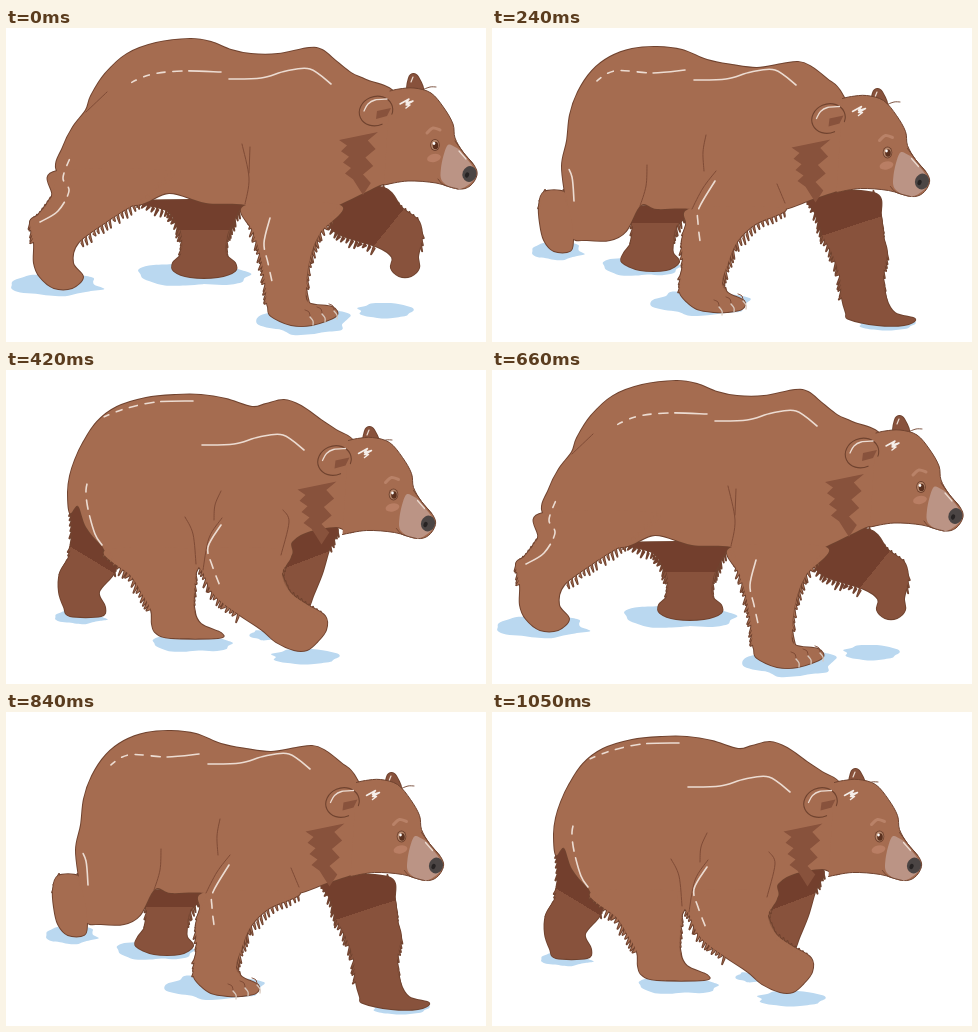
These frames come from a looping animation (480x314 px, 1.26 s). An HTML page with a canvas:

```html
<!DOCTYPE html>
<html lang="en">
<head>
<meta charset="utf-8">
<title>Walking bear</title>
<style>
html, body { margin: 0; width: 100%; height: 100%; overflow: hidden; background: #fff; }
canvas { display: block; }
</style>
</head>
<body>
<canvas id="stage" width="480" height="314"></canvas>
<script>
const ctx = document.getElementById('stage').getContext('2d');
const COAT = '#a56c50', FAR = '#88523c', DEEP = '#733f2d', EDGE = '#70432f',
      CREASE = '#7f4b36', SNOW = '#bad8f0', SHINE = '#ecdcd2';
const HOLD = 210;
const DASH = [32, 7, 9, 8, 8, 8, 6, 8, 5, 99];

// Each leg row is "left,right,y"; far legs turn from deep to lighter at the point "fade".
const poses = [
  {
    head: [0, 0], ear: [0, 0], wave: [0, 0],
    torso: `51,143 57,119 67,99 80,82 85,68 99,46 121,26 150,15 184,11 205,14 225,22 245,26 272,26 303,20 316,22
      331,34 345,45 360,52 390,66 405,110 390,150 372,158 335,176 300,190 240,177 200,175 163,165 130,177 80,170`,
    near: ['51,165,143 46,140,168 33,112,186 24,100,194 28,72,215 28,67,235 34,77,249 48,66,260',
           '240,334,177 248,314,205 255,304,230 260,300,260 261,303,275 262,326,279 265,330,288 285,306,297'],
    far: [{ fade: [0, 202], rows: '134,240,173 160,233,182 170,227,194 176,221,208 175,220,226 167,229,235 168,229,243 184,212,249' },
          { fade: [329, 266], rows: '335,378,160 323,396,180 321,412,192 333,416,206 372,414,219 386,412,229 385,413,240 393,405,248' }],
    snow: [[51, 257, 46, 11], [189, 246, 55, 12], [296, 292, 47, 14], [380, 283, 28, 8]],
    shine: ['215,44 176,43 143,47 115,60', '34,194 52,183 63,163 57,150 64,130', '264,190 258,215 262,235 267,258'],
    creases: ['236,116 243,150 239,176', '244,119 243,145', '80,84 101,64'],
    toes: [304, 288]
  },
  {
    head: [-33.5, 7.5], ear: [-22, 15], wave: [-21, 1],
    torso: `74,172 70,138 75,113 78,87 86,64 100,43 118,29 140,21 165,19 190,22 215,32 240,37 265,40 290,36 306,34
      318,38 335,51 350,66 372,118 357,158 345,163 318,172 293,181 250,190 199,181 165,181 149,177 134,203 118,212 95,212 79,208`,
    near: ['52,72,164 47,76,178 48,80,195 52,81,212 62,78,223',
           '201,292,180 194,262,197 190,245,214 191,236,235 188,230,255 188,236,265 194,252,273 205,250,281 222,235,284'],
    far: [{ fade: [0, 195], rows: '138,196,180 141,184,199 139,181,215 132,181,225 130,187,234 148,174,242' },
          { fade: [93, 285], rows: '316,382,165 325,389,188 331,391,208 340,395,225 348,391,248 350,394,270 354,403,285 357,423,291 385,412,297' }],
    snow: [[66, 223, 26, 9], [150, 238, 38, 10], [207, 275, 50, 12], [395, 296, 29, 7]],
    shine: ['193,42 160,45 122,43 100,57', '82,173 80,149 74,136', '223,153 207,180 206,195 208,213'],
    creases: ['214,107 211,124 212,143', '224,143 211,160 200,181', '155,137 154,158 148,178', '285,156 293,175'],
    toes: [227, 278]
  },
  {
    head: [-41.5, 7.5], ear: [-44, 11], wave: [-27, 24],
    torso: `72,136 64,143 62,122 64,106 69,90 77,73 91,52 111,37 140,28 170,25 195,25 220,29 246,37 260,34 278,30
      295,36 315,50 330,60 350,74 364,118 349,160 330,157 302,162 286,172 278,189 190,194 113,190 95,175 80,157`,
    near: ['100,190,180 125,189,206 135,188,222 145,188,240 146,195,254 150,215,263 165,212,268',
           '190,280,180 198,276,204 206,284,222 218,300,234 235,319,246 256,320,260 270,311,272 288,301,280'],
    far: [{ fade: [-61, 101], rows: '66,76,140 66,95,165 64,110,185 54,108,203 53,93,222 58,99,237 64,95,246' },
          { fade: [102, 266], rows: '300,331,158 280,323,180 276,316,204 284,307,226 295,303,236' }],
    snow: [[75, 247, 26, 7], [187, 273, 39, 9], [259, 265, 16, 5], [300, 287, 34, 8]],
    shine: ['187,31 150,32 118,39 93,49', '96,175 89,164 82,139 80,120 83,108', '215,155 202,177 206,195 214,216'],
    creases: ['179,147 187,164 190,194', '215,121 209,135 208,150', '216,148 203,168 197,200', '277,140 283,152 275,185']
  }
];

let seed = 1;
const random = () => (seed = seed * 16807 % 2147483647) / 2147483647;
const parse = s => s.trim().split(/\s+/).map(p => p.split(',').map(Number));

// Smooth curve through all points.
function curve(p, closed) {
  const path = new Path2D(), n = p.length;
  const at = i => closed ? p[(i + n) % n] : p[Math.max(0, Math.min(n - 1, i))];
  path.moveTo(...p[0]);
  for (let i = 0; i < (closed ? n : n - 1); i++) {
    const [a, b, c, d] = [at(i - 1), at(i), at(i + 1), at(i + 2)];
    path.bezierCurveTo(b[0] + (c[0] - a[0]) / 6, b[1] + (c[1] - a[1]) / 6,
                       c[0] - (d[0] - b[0]) / 6, c[1] - (d[1] - b[1]) / 6, ...c);
  }
  return path;
}

function fill(path, color) {
  ctx.fillStyle = color;
  ctx.fill(path);
}

function stroke(path, color, width) {
  ctx.strokeStyle = color;
  ctx.lineWidth = width;
  ctx.stroke(path);
}

const line = (s, color, width) => stroke(curve(parse(s)), color, width);

function oval(x, y, rx, ry, color, turn = 0) {
  const path = new Path2D();
  path.ellipse(x, y, rx, ry, turn, 0, 7);
  fill(path, color);
}

function shifted([x, y], paint) {
  ctx.save();
  ctx.translate(x, y);
  paint();
  ctx.restore();
}

// Hanging tufts along one side of a leg.
function fur(side, lean) {
  const path = new Path2D();
  for (let i = 0; i < side.length - 4; i++) {
    const [x, y] = side[i], dx = side[i + 1][0] - x, dy = side[i + 1][1] - y;
    const count = Math.ceil(Math.hypot(dx, dy) / 5);
    for (let k = 0; k < count; k++) {
      const px = x + dx * k / count, py = y + dy * k / count;
      path.moveTo(px - lean, py - 2);
      path.lineTo(px + lean * (1 + 2 * random()), py + 4 + 5 * random());
      path.lineTo(px - lean, py + 3);
    }
  }
  return path;
}

function leg(rows) {
  const r = parse(rows), left = r.map(([l, , y]) => [l, y]), right = r.map(([, x, y]) => [x, y]);
  return [curve([...left, ...[...right].reverse()], true), fur(left, -1), fur(right, 0.6)];
}

// Outline the parts as one silhouette.
function merge(parts, color) {
  parts.forEach(p => stroke(p, EDGE, 2));
  parts.forEach(p => fill(p, color));
}

function puddle([x, y, rx, ry]) {
  const p = [];
  for (let a = 0; a < 6.2; a += Math.PI / 9) {
    const k = 0.82 + 0.3 * random();
    p.push([x + rx * k * Math.cos(a), y + ry * k * Math.sin(a)]);
  }
  fill(curve(p, true), SNOW);
}

function farLeg({ fade, rows }) {
  const shade = ctx.createLinearGradient(0, 0, ...fade);
  shade.addColorStop(1, DEEP);
  shade.addColorStop(1, FAR);
  merge(leg(rows), shade);
}

function farEar() {
  merge([curve(parse('402,63 403,50 407,46 412,49 417,63'), true)], FAR);
  line('405,54 407,49', SHINE, 1.2);
  line('416,62 424,59 430,59', EDGE, 0.9);
}

function ruff() {
  const path = new Path2D();
  for (let i = 0; i < 8; i++) path.lineTo(333 + i + i % 2 * 7, 112 + i * 5.6);
  path.lineTo(357, 167);
  for (let i = 6; i >= 0; i--) path.lineTo(372 - i * 1.2 - i % 2 * 9, 104 + i * 8.5);
  fill(path, FAR);
}

function toes([x, y]) {
  for (let i = 0; i < 3; i++) {
    const tx = x + i * 12, ty = y - i * 3;
    line(`${tx - 5},${ty - 6} ${tx - 1},${ty - 4} ${tx},${ty}`, CREASE, 1);
    line(`${tx},${ty + 1} ${tx + 3},${ty + 5} ${tx + 3},${ty + 9}`, '#d8c8bd', 1.3);
  }
}

function nearEar() {
  const path = new Path2D();
  path.ellipse(370, 83, 17, 14.5, -0.35, 1.5, 6.9);
  fill(path, COAT);
  stroke(path, EDGE, 1.1);
  fill(new Path2D('M371 83L385 80L381 88L370 91Z'), FAR);
  line('358,83 362,76 369,72 381,71', SHINE, 1.3);
}

function face() {
  fill(curve(parse('441,118 435,140 437,154 454,161 470,147 457,126 449,119'), true), '#bb9485');
  line('449,113 457,124 467,136', EDGE, 0.9);
  line('432,151 438,157 452,161', EDGE, 0.9);
  line('453,123 460,131', SHINE, 1.2);
  oval(463.5, 146, 7, 8, '#4b4544', 0.35);
  oval(461, 147, 2, 2.7, '#272323', 0.4);
  oval(428, 130, 7, 4, '#b97e64', -0.2);
  line('421,105 427,100 434,102', '#b98268', 3);
  oval(429, 117, 4.8, 6, EDGE);
  oval(429, 117, 3.9, 5, '#b98b70');
  oval(429.5, 117.5, 2.8, 3.8, '#5b311f');
  oval(428, 115.5, 1.3, 1.4, '#fff');
}

function head() {
  const skull = curve(parse('384,63 393,61 408,60 425,65 438,80 447,96 449,110 457,124 468,137 471,147 464,158 452,161 430,155 402,153 378,157'));
  fill(skull, COAT);
  stroke(skull, EDGE, 1);
  face();
  nearEar();
  stroke(new Path2D('M394 76L403 71L400 75L407 73L400 77L404 77L400 80'), '#f5eee9', 1.5);
}

function draw(pose) {
  seed = 7;
  ctx.fillStyle = '#fff';
  ctx.fillRect(0, 0, 480, 314);
  pose.snow.forEach(puddle);
  pose.far.forEach(farLeg);
  shifted(pose.ear, farEar);
  merge([curve(parse(pose.torso), true), ...pose.near.flatMap(leg)], COAT);
  shifted(pose.head, ruff);
  pose.creases.forEach(s => line(s, CREASE, 1));
  if (pose.toes) toes(pose.toes);
  shifted(pose.wave, () => line('223,51 255,50 280,43 304,41 325,56', SHINE, 1.6));
  ctx.setLineDash(DASH);
  pose.shine.forEach(s => line(s, SHINE, 1.6));
  ctx.setLineDash([]);
  shifted(pose.head, head);
}

ctx.lineCap = ctx.lineJoin = 'round';
const start = performance.now();
let shown = -1;

function tick() {
  const step = Math.floor((performance.now() - start) / HOLD) % poses.length;
  if (step !== shown) draw(poses[shown = step]);
  requestAnimationFrame(tick);
}
tick();
</script>
</body>
</html>
```
